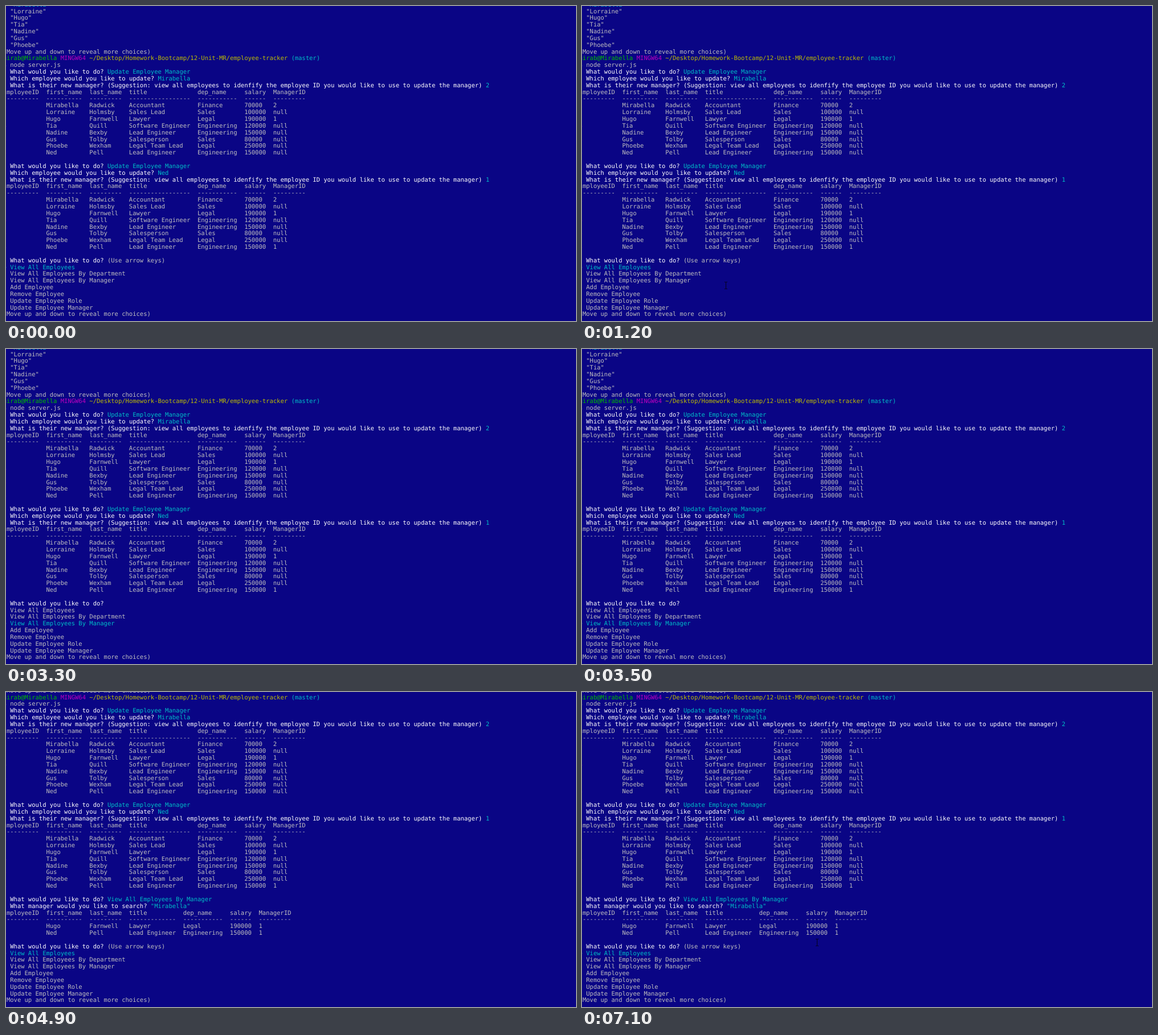
These frames come from a looping animation (1000 px wide and 554 px high, 7.2 s). An HTML page:

```html
<!DOCTYPE html>
<html lang="en">
<head>
<meta charset="utf-8">
<title>Employee tracker</title>
<style>
  html, body { margin: 0; width: 100%; height: 100%; overflow: hidden; background: #0a0585; }
  #log {
    position: absolute; left: -5.4px; margin: 0; white-space: pre;
    font: 10.506px/11.844px "DejaVu Sans Mono", monospace;
    text-rendering: geometricPrecision; font-variant-ligatures: none;
    color: #c0c0c0;
  }
  .w { color: #fff; }
  .c { color: #00bfc8; }
  .g { color: #00bf00; }
  .m { color: #bf00bf; }
  .y { color: #bfbf00; }
  #beam { position: absolute; left: 0; top: 0; width: 9px; height: 13px; visibility: hidden; }
</style>
</head>
<body>
<pre id="log"></pre>
<svg id="beam" viewBox="0 0 9 13"><path d="M2 .5H4L4.5 1L5 .5H7M4.5 1V12M2 12.5H4L4.5 12L5 12.5H7" fill="none" stroke="#04021c"/></svg>
<script>
const LOOP = 7200, ROW = 11.844, TOP = 4.5;
const log = document.getElementById('log');
const beam = document.getElementById('beam');

const paint = (cls, text) => `<span class="${cls}">${text}</span>`;
const ask = (text, answer = '') => paint('g', '?') + ' ' + paint('w', text) + ' ' + answer;
const reply = (text, answer) => ask(text, paint('c', answer));

const HEAD = ['EmployeeID', 'first_name', 'last_name', 'title', 'dep_name', 'salary', 'ManagerID'];
const STAFF = [
  'Mirabella,Radwick,Accountant,Finance,70000,2',
  'Lorraine,Holmsby,Sales Lead,Sales,100000,null',
  'Hugo,Farnwell,Lawyer,Legal,190000,1',
  'Tia,Quill,Software Engineer,Engineering,120000,null',
  'Nadine,Bexby,Lead Engineer,Engineering,150000,null',
  'Gus,Tolby,Salesperson,Sales,80000,null',
  'Phoebe,Wexham,Legal Team Lead,Legal,250000,null',
  'Ned,Pell,Lead Engineer,Engineering,150000,null'
].map((line, i) => [String(i + 1), ...line.split(',')]);
const MOVED = STAFF.map((r, i) => i === 7 ? [...r.slice(0, 6), '1'] : r);

function table(rows) {
  const widths = HEAD.map((h, i) => Math.max(h.length, ...rows.map(r => r[i].length)));
  const line = cells => cells.map((c, i) => c.padEnd(widths[i])).join('  ');
  return [
    line(HEAD),
    line(widths.map(n => '-'.repeat(n))),
    ...rows.map(r => paint('m', r[0]) + line(r).slice(r[0].length)),
    ''
  ];
}

const MORE = '(Move up and down to reveal more choices)';
const HINT = '(Use arrow keys)';
const MENU = ['View All Employees', 'View All Employees By Department', 'View All Employees By Manager',
  'Add Employee', 'Remove Employee', 'Update Employee Role', 'Update Employee Manager'];
const BOSSES = STAFF.slice(0, 7).map(r => `"${r[1]}"`);
const choices = (items, sel) =>
  [...items.map((s, i) => i === sel ? paint('c', '&gt; ' + s) : '  ' + s), MORE];

const TODO = 'What would you like to do?';
const update = (name, id, rows) => [
  reply(TODO, 'Update Employee Manager'),
  reply('Which employee would you like to update?', name),
  reply('What is their new manager? (Suggestion: view all employees to idenfify the employee ID ' +
    'you would like to use to update the manager)', id),
  ...table(rows)
];
const menu = (sel, hint) => [ask(TODO, hint), ...choices(MENU, sel)];

const history = [
  ...choices(BOSSES, 0),
  [paint('g', 'mirab@Mirabella'), paint('m', 'MINGW64'),
    paint('y', '~/Desktop/Homework-Bootcamp/12-Unit-MR/employee-tracker'), paint('c', '(master)')].join(' '),
  '$ node server.js',
  ...update('Mirabella', '2', STAFF),
  ...update('Ned', '1', MOVED)
];
const byManager = reply(TODO, MENU[2]);
const SEARCH = 'What manager would you like to search?';

// start time, rows scrolled off, lines after the history
const SCENES = [
  [0, 1, menu(0, HINT)],
  [2800, 1, menu(1)],
  [3300, 1, menu(2)],
  [4000, 2, [byManager, ask(SEARCH, HINT), ...choices(BOSSES, 0)]],
  [4900, 8, [byManager, reply(SEARCH, BOSSES[0]),
    ...table(MOVED.filter(r => r[6] === '1')), ...menu(0, HINT)]]
];

// pointer visits: appears, rests, leaves, from, to
const VISITS = [
  [300, 1000, 2000, [330, 540], [252, 491]],
  [6500, 7100, LOOP, [470, 540], [412, 440]]
];

let shown;
function draw(now) {
  const t = now % LOOP;
  const scene = SCENES.filter(s => s[0] <= t).pop();
  if (scene !== shown) {
    shown = scene;
    log.innerHTML = history.concat(scene[2]).join('\n');
    log.style.top = TOP - scene[1] * ROW + 'px';
  }
  const visit = VISITS.find(v => t >= v[0] && t < v[2]);
  beam.style.visibility = visit ? 'visible' : 'hidden';
  if (visit) {
    const [start, rest, , from, to] = visit;
    const p = Math.min(1, (Math.floor(t / 100) * 100 - start) / (rest - start));
    const e = 1 - (1 - p) ** 2;
    const [x, y] = from.map((a, i) => Math.round(a + (to[i] - a) * e));
    beam.style.transform = `translate(${x - 4}px, ${y - 6}px)`;
  }
}

function tick() {
  draw(performance.now());
  requestAnimationFrame(tick);
}
tick();
</script>
</body>
</html>
```
